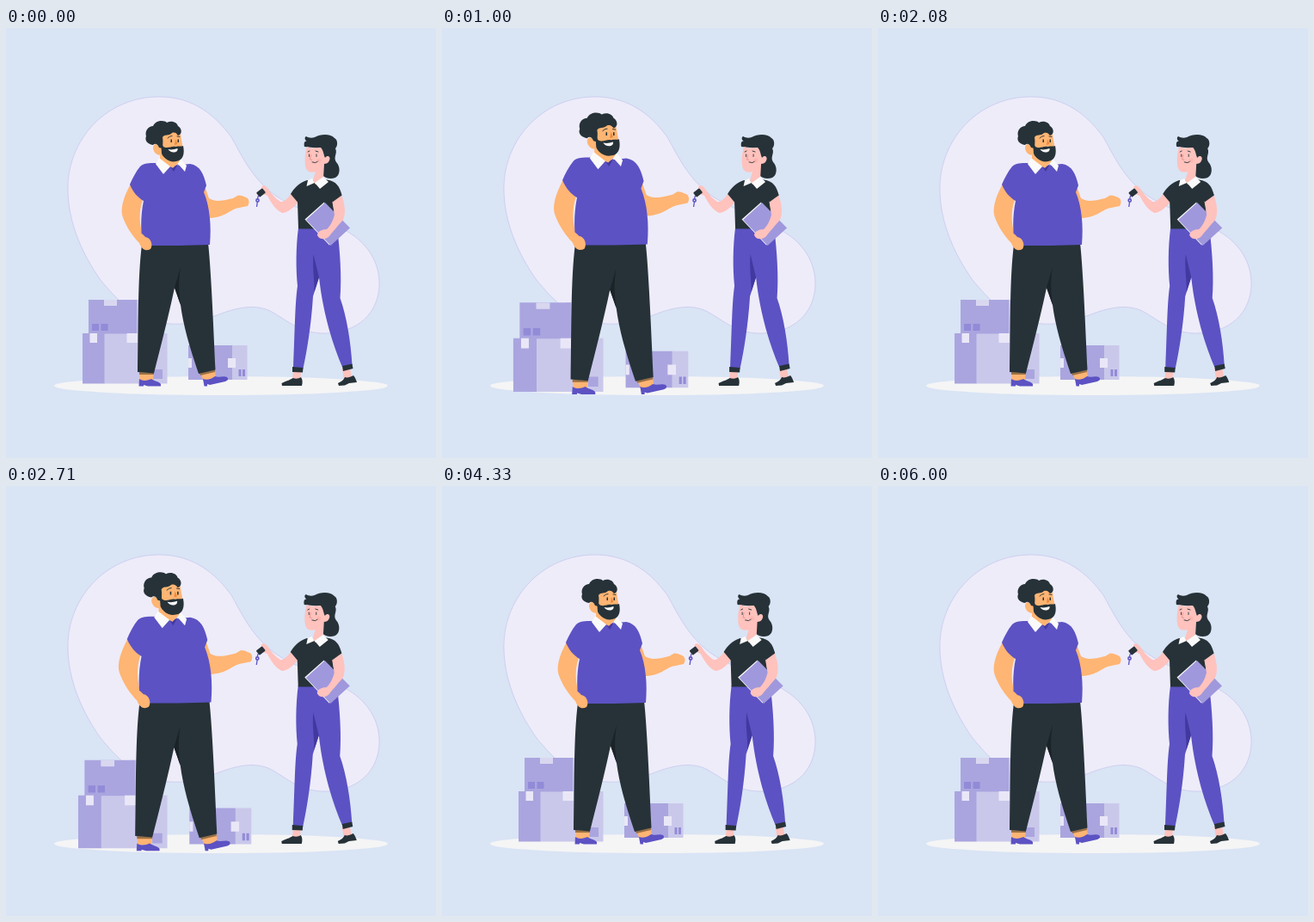
Animation, 500 px wide and 500 px high, one loop 6.04 s. Source, as an HTML page:

```html
<!DOCTYPE html>
<html lang="en">
<head>
<meta charset="utf-8">
<title>Handing over the keys</title>
<style>
  html, body { margin: 0; width: 100%; height: 100%; overflow: hidden; background: #d9e4f5; }
  svg { display: block; width: 100%; height: 100%; }
  .dark { fill: #263238; }
  .purple { fill: #5c52c3; }
  .mid { fill: #aaa5df; }
  .pale { fill: #cac8ea; }
  .tape { fill: #e9e7f7; }
  .mark { fill: #928bd7; }
  .tan { fill: #ffb573; }
  .pink { fill: #ffc2bd; }
  .white { fill: #fafafa; }
  .line { fill: none; stroke: #263238; stroke-width: .9; stroke-linecap: round; }
</style>
</head>
<body>
<svg viewBox="0 0 500 500">
  <path fill="#eeecf9" stroke="#8d87d4" stroke-width=".25" d="M72 187C72 128 118 80 178 80C218 80 244 102 262 127C273 146 285 174 312 194C338 213 375 220 405 242C425 257 434 277 434 297C434 332 408 355 370 355C340 355 324 337 305 328C287 321 268 325 245 334C222 343 205 346 180 343C150 338 128 315 110 293C88 262 72 225 72 187Z"/>
  <ellipse cx="250" cy="416" rx="194" ry="11" fill="#f5f5f5"/>

  <g id="boxes">
    <path class="pale" d="M114 355H187.5V413.5H114ZM146 316H155V355H146ZM263 369H280.500V409H263Z"/>
    <path class="mid" d="M89 355H114.500V413.500H89ZM96 316H152V355.500H96ZM212 369H263V409H212ZM171 397H182V408H171Z"/>
    <path class="tape" d="M97.500 355H106V366H97.500ZM140.500 355H153V366H140.500ZM258 384H267V395H258ZM212 384H216V395H212Z"/>
    <path fill="#d9d7f0" d="M114 316H129V323H114Z"/>
    <path class="mark" d="M100 344H108V352H100ZM110.500 344H118.500V352H110.500ZM270.500 397H273.500V405H270.500ZM275 397H278V405H275Z"/>
  </g>

  <g id="man">
    <!-- feet and trousers -->
    <path class="tan" d="M155 400H172L171 410H156ZM226 401L243 398L244 407L230 411Z"/>
    <path class="purple" d="M155 408C159 411 165 410 169 408C173 411 178 411 180 414V416.500H165L160 415V416.500H154.500ZM229 408C234 410 239 408 243 405C248 407 253 404 257 406C259 408 258 410 255 411L237 415L234 414V416.500H230.500Z"/>
    <path fill="#9b7044" d="M155 400L172 401V403H155ZM225 401L243 397.500V400L226 404Z"/>
    <path class="dark" d="M158 252L235 250C238 275 241 340 243.500 397.500L224 402C213 370 206 345 203 322L196 302C189 335 180 370 172 401.500L153 400C154 350 153 290 158 252Z"/>
    <path fill="#1a2327" d="M203 278L196 302L203 322C201 308 200 295 203 278Z"/>

    <!-- arms and shirt -->
    <path class="tan" d="M231 184L236 198C245 204 258 199 264 198L270 194.500L274 195L278 196.500L281 198C283 201 283 204 281 207L269 209.500C261 211 255 220 237 221L229 191Z"/>
    <path class="tan" d="M145 181C136 198 133 210 135.500 219C140 232 148 243 155 250L160 244C155 230 154 214 159 200Z"/>
    <path class="purple" d="M175 157C166 157 160 157 156 161C151 167 147 175 144 182C148 191 153 197 160 201C156 220 157 238 159 253C185 253 215 253 237 252C239 230 237 208 230 191L233 183C230 170 226 160 214 158L194 160Z"/>
    <path class="tan" d="M152 240C156 236 159 240 162 243C169 244 171 253 168 257C163 260 158 258 155 250Z"/>
    <path class="tan" d="M179 144V153L190 161L194 163L203 154L202 148Z"/>
    <path class="white" d="M178 151L174 158L183 170L191 161ZM203 152L210 160L208 167L200 158Z"/>
    <path fill="#42399f" d="M191 161L194 163L200 158L195 167Z"/>

    <!-- head -->
    <path class="tan" d="M177 130C183 121 196 118 203 124C204 132 206 138 206 146L190 152L182 147C176 150 171 144 171 139C172 134 175 134 178 138Z"/>
    <path class="dark" d="M171 136C164 135 161 130 163 126C161 119 166 114 171 114C174 107 184 107 187 110C193 107 199 110 200 114C205 117 205 124 200 125C198 122 196 121 193 122C189 126 185 123 182 127C183 132 182 136 182 140L178 139C176 134 173 134 171 136Z"/>
    <path class="dark" d="M180 132L183 138C188 141 192 137 197 138C201 137 204 138 206 137C208 146 206 154 198 155C190 157 183 151 181 146Z"/>
    <path class="white" d="M188.500 141C193 142 196 141 199.500 140C200 143 198 144.500 195 144.500C192 144.500 190 143 188.500 141Z"/>
    <path class="dark" d="M191.500 129.500h1.500v3.500h-1.500ZM199.500 129.500h1.500v3.500h-1.500Z"/>
    <path class="line" d="M188 128Q190 125.500 193 125.500M199 126L202 126.500"/>
    <path d="M197 129L199.500 135L196 136Z" fill="#e98a3d"/>
  </g>

  <g id="woman">
    <!-- feet and trousers -->
    <path class="pink" d="M334 399H343L342 410H333ZM391 396L400 395L402 407L393 409Z"/>
    <path class="dark" d="M320.500 413C327 410 331 409 333.500 407C337 408 340 408 343 406C345 409 345 412 344 416H321ZM386 413C390 411 393 409 394 406C397 407 400 406 404 404C406 406 407 409 408 412L399 413L394 415.500L387 416Z"/>
    <path class="purple" d="M340 232H385C388.500 260 390.500 290 388.500 314C396 335 401 365 402.500 392L391 394C381 370 369 335 364 290L357 312C355 345 350 375 345.500 396L334 395C336 350 336 320 339 300C337 280 337 255 340 232Z"/>
    <path fill="#4239a0" d="M357.500 263L364 290L358.500 307C359 293 356 280 357.500 263Z"/>
    <path class="dark" d="M333 394L345.500 395L345 400.500L333 400ZM391 393L402.500 390.500L403.500 396L392 399Z"/>

    <!-- key hand -->
    <path class="pink" d="M332 192C328 198 323 203 319 202C313 198 308 192 305 187C302 183 299 182 297 185L299 193L304 195C308 203 314 212 321 215C328 215 335 208 340 202Z"/>
    <rect class="dark" x="-4.500" y="-3.300" width="9" height="6.600" rx="1" transform="translate(296.500 191.500) rotate(-38)"/>
    <g fill="none" stroke="#5c52c3">
      <circle cx="292.500" cy="200.500" r="1.600" stroke-width="1.600"/>
      <path d="M292.300 202.500L291.500 208M292.500 198L293.500 195" stroke-width="1.300"/>
    </g>

    <!-- hair, top and face -->
    <path class="dark" d="M347 138C346 134 347 131 350 132C347 130 347 127 349 126C352 128 356 128 359 127C366 123 378 123 382 128C386 130 386 137 383 140C386 146 380 150 384 156C389 161 389 171 383 174C378 176 371 175 368 171L364 158L366 140Z"/>
    <path class="dark" d="M350 177C341 180 335 186 331 193L339 202.500L340 233.500H384L380 202L390.500 194.500C388 184 384 178 373 176.500Z"/>
    <path class="pink" d="M350 138C356 141 362 139 366 139C369 142 369 146 371 151C374 147 378 150 376 154C375 157 372 158 370 158L369 175L360 182L357 177L360 167C354 169 349 167 348 160C347 151 348 145 350 138Z"/>
    <path class="white" d="M356 175L351 177L349.500 184L359 180ZM369 173L375 179L365 187L359 180Z"/>
    <path class="line" d="M352.500 147v2.500M361 147v2.500M351 144L353 143M360 143L363 144M356 156Q360 158 363 155"/>
    <path d="M354.500 147L353.500 153L356 153.500" fill="none" stroke="#e08b86" stroke-width=".8"/>
    <circle cx="364" cy="154" r="2.500" fill="#ffa9a4" opacity=".5"/>

    <!-- folder and arm -->
    <path class="white" d="M370 202.500L347.500 222.500L376 252.500L379 250Z"/>
    <path fill="#a098dc" d="M371 203L400 232.500L377.500 253L349 223Z"/>
    <path class="pink" d="M379 200L390.500 194.500C394.500 207 395 216 392 223C386 230 379 238 376 242C371 247 364 246 362 241C362 237 367 234 373 234C377 230 380 225 382 217Z"/>
    <path class="dark" d="M374 190L388 189L390.500 194.500L379.500 202.500Z"/>
  </g>
</svg>
<script>
  const LOOP = 6040;

  // [time in ms, value]
  const beat = [[0, 1], [605, 1.1], [1650, 1], [2380, 1], [3030, 1.1], [3560, 1], [LOOP, 1]];
  const shake = [[0, 0], [420, -2], [1080, 1.2], [1760, -4], [2390, 4.2], [3000, -4],
                 [3560, 4.4], [4200, -4], [4820, 2], [5400, -1], [5900, 0], [LOOP, 0]];

  const linear = u => u;
  const smooth = u => (1 - Math.cos(Math.PI * u)) / 2;

  function sample(keys, t, ease) {
    const i = keys.findIndex(key => key[0] > t);
    const [t0, a] = keys[i - 1], [t1, b] = keys[i];
    return a + (b - a) * ease((t - t0) / (t1 - t0));
  }

  function move(id, transform) {
    document.getElementById(id).setAttribute('transform', transform);
  }

  const zoom = (x, y, s) => `translate(${x} ${y}) scale(${s}) translate(${-x} ${-y})`;

  function draw() {
    const t = performance.now() % LOOP;
    const s = sample(beat, t, linear);
    move('boxes', zoom(187, 262, s));
    move('man', zoom(208, 262, s));
    move('woman', `translate(${sample(shake, t, smooth)} 0)`);
    requestAnimationFrame(draw);
  }
  draw();
</script>
</body>
</html>
```
